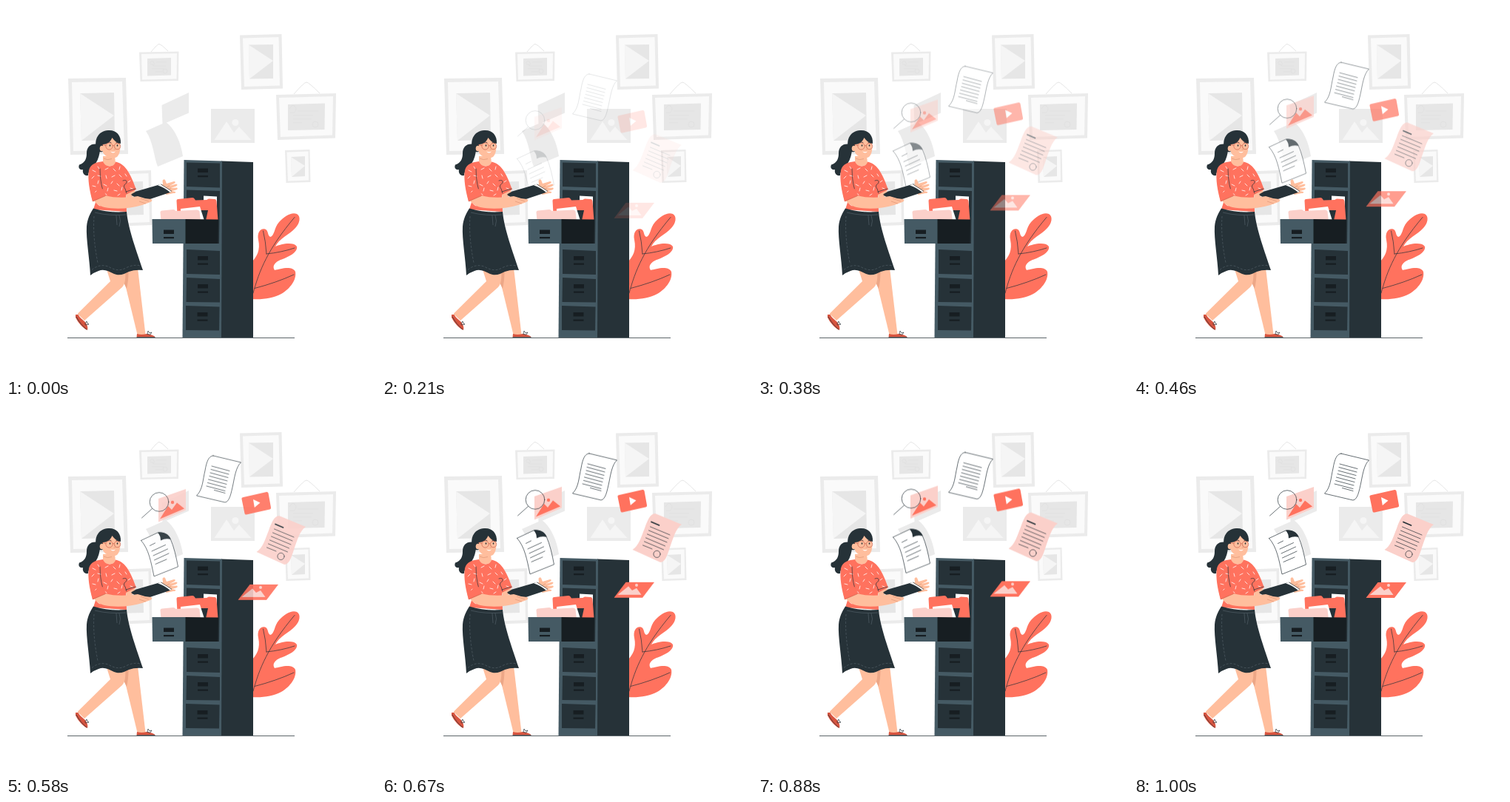
An HTML page that plays this animation: 500x500 px, repeating every 1.04 s.

```html
<!DOCTYPE html>
<html lang="en">
<head>
<meta charset="utf-8">
<title>Filing cabinet</title>
<style>
  html, body { margin: 0; width: 100%; height: 100%; overflow: hidden; background: #fff; }
  svg { display: block; width: 100vw; height: 100vh; }
  .rise { animation: rise 1040ms infinite; }
  @keyframes rise {
    0% { opacity: 0; transform: translateY(30px); animation-timing-function: cubic-bezier(.36, -.01, .5, 1.38); }
    93.5%, 100% { opacity: 1; transform: translateY(0); }
  }
  .g1 { fill: #ebebeb; }
  .g2 { fill: #fafafa; }
  .g3 { fill: #e6e6e6; }
  .g4 { fill: #f5f5f5; }
  .dark { fill: #263238; }
  .mid { fill: #455a64; }
  .deep { fill: #171e22; }
  .red { fill: #ff725e; }
  .pink { fill: #fbd0ca; }
  .shoe { fill: #d8543f; }
  .skin { fill: #ffbe9d; }
  .white { fill: #fff; }
  .line, .sheet { stroke: #263238; stroke-width: .7; stroke-linecap: round; stroke-linejoin: round; }
  .line { fill: none; }
  .sheet { fill: #fff; }
  .faint { fill: none; stroke: #dedede; stroke-width: .7; }
  .wire { fill: none; stroke: #e3e3e3; stroke-width: .9; }
  .seam { fill: none; stroke: #58666d; stroke-width: .6; }
  .dash { stroke-dasharray: 3 2; }
  .fold { fill: none; stroke: #d98f70; stroke-width: .6; }
</style>
</head>
<body>
<svg viewBox="0 0 500 500">
  <defs>
    <g id="handle" class="deep">
      <path d="M0 0h14v5.500H0zM0 9.500h14v2.200H0z"/>
    </g>
  </defs>

  <!-- wall -->
  <g>
    <path class="g1" d="M84 98L162 97L165 200L87 201Z"/>
    <path class="g2" d="M89 103L157 102L160 195L91 196Z"/>
    <path class="g3" d="M100 118L146 117L147 181L102 182Z"/>
    <path class="g4" d="M100 118L146 148L102 182Z"/>

    <path class="wire" d="M196 62Q205 51 207 51.500Q210 52 219 61"/>
    <path class="g1" d="M180 62.500L233.500 61.500L233 101L181.500 102Z"/>
    <path class="g2" d="M183 65L231 64L230.500 98.500L184 99.500Z"/>
    <path class="g3" d="M191 71L223 70L223 93.500L191 94.500Z"/>
    <path class="faint" d="M194 77q4-5 6 0t-5 1M203 76h14M198 81h18M197 85h17M202 89h9M212 88a3 3 0 1 0 6 0a3 3 0 1 0-6 0"/>

    <path class="g1" d="M316 39.500L372.500 38L374 111.500L318 113Z"/>
    <path class="g2" d="M320 43.500L368.500 42L370 107.500L322 109Z"/>
    <path class="g3" d="M328 52.500L361 52L361 98L329 98.500Z"/>
    <path class="g4" d="M328 52.500L361 74L329 98.500Z"/>

    <path class="wire" d="M389 119Q403 103 406 103Q409 103 424 118"/>
    <path class="g1" d="M365 120L446 118L445 178.500L367 181Z"/>
    <path class="g2" d="M369 124L442 122L441 174.500L371 177Z"/>
    <path class="g3" d="M381 133L431 131.500L430.500 167L381 168Z"/>
    <path class="faint" d="M383 139q5-9 9-1q0 8-8 6M394 142h28M388 148h27M388 153h25M388 158h12M414 160a4 4 0 1 0 8 0a4 4 0 1 0-8 0"/>

    <path class="g1" d="M377 195L410.500 194L411.500 238L378.500 239Z"/>
    <path class="g2" d="M379.500 197.500L408.500 196.500L409 235.500L381 236.500Z"/>
    <path class="g3" d="M385 204L404 203L404 230L386 231Z"/>
    <path class="g4" d="M385 204L404 216L386 231Z"/>

    <path class="g1" d="M140 224L196 222L197.500 296L142 298Z"/>
    <path class="g2" d="M145 228L192.500 226L194 292L147 294Z"/>
    <path class="g3" d="M153 238L185 237L186 282L154 283Z"/>

    <path class="g1" d="M277 139H336V185H277Z"/>
    <path class="g4" d="M281.500 181L298 156L308 171L315 163L331.500 181Z"/>
    <circle class="g4" cx="310" cy="157.500" r="4.500"/>

    <path class="g1" d="M210.500 134L247 117V144.500L211.500 160Z"/>
    <path class="g1" d="M189 169L216 157C228 165 237 186 239 203L205 217C200 205 199 183 189 169Z"/>
  </g>

  <path class="dark" d="M83 448.100H390V448.800H83Z"/>

  <!-- leaf -->
  <path class="red" d="M332 396V346C339 339 344 330 341 316C339 306 344 300 350 301.500C355 303 353 310 357 312C363 311 362 300 369 292C376 284 386 278 393 281C399 284 397 294 391 300C383 309 369 314 364 325C371 322 388 318 393 325C395 333 380 340 371 343C364 346 359 351 363 357C370 356 386 350 391 359C393 370 384 382 372 389C361 395 346 397 332 396Z"/>
  <path class="line" d="M334 388C342 358 354 328 390 285.500M352 335Q351 318 347.500 304M352 335Q372 333 390 327M336 381.500Q365 374 389 363"/>

  <!-- cabinet -->
  <path class="dark" d="M291 209.500L334 211V448H291Z"/>
  <path class="mid" d="M240.500 208L292 209.500L291 448H238.500Z"/>
  <g class="dark">
    <path d="M244 211.500L289 212.500V245.500L244 244Z"/>
    <path d="M244 248.500L289 250L288 321H243Z"/>
    <path d="M244 329L289 331V363L244 362Z"/>
    <path d="M244 367L289 369V400.500L243.500 400Z"/>
    <path d="M243 405L288.500 406.500L288 438.500L243 438Z"/>
  </g>
  <use href="#handle" x="259" y="219.500"/>
  <use href="#handle" x="259" y="338"/>
  <use href="#handle" x="259" y="376"/>
  <use href="#handle" x="258.500" y="414"/>

  <path class="white" d="M267 256.500L285 257.500V290H267Z"/>
  <path class="red" d="M230.500 263Q230.500 261 232.500 261L252 259Q254 259 255 261L256 262.500L271 262L274 260.500L282 261Q284 261 284.500 264L286.500 290H232Z"/>
  <path class="dark" d="M262 276H273L270 290H262Z"/>
  <path class="white" d="M236 274L262 271L268 290H236Z"/>
  <path class="pink" d="M208.500 279Q208.500 276.500 211 276.500L226 275Q228 275 229.500 277L258 275.500Q261 275.500 261.500 278L263 290H209.500Z"/>
  <path class="deep" d="M242 288L287 288.500L286.500 321H242Z"/>
  <path class="mid" d="M197.500 288H242.500V321H198Z"/>
  <use href="#handle" x="213" y="302.500"/>

  <!-- flying files -->
  <g class="rise">
    <path class="pink" d="M206 125L243 112V140.500L206 156.500Z"/>
    <path class="red" d="M208 152.500L219 135L224 140L231 130.500L241 138.500Z"/>
    <circle class="red" cx="225" cy="130" r="2.200"/>
    <circle class="line" cx="207" cy="129.500" r="12.800"/>
    <path class="line" d="M197.500 138.500L183.500 151"/>

    <path class="sheet" d="M280 67L317.500 76C311 82 309 95 307 105C304 119 302 129 296 130L257.500 121C266 113 266 99 269 87C271 75 274 67 280 67Z"/>
    <path class="line" d="M278 81l24 6.500M277 85.500l24 6.500M276 90l24 6.500M275 94.500l24 6.500M273.500 99l24.500 6.500M272.500 103.500l24.500 6.500M271 108l25 6.500M281.500 113.500l14.500 4"/>

    <path class="sheet" d="M182.500 181.500L206 170.500C214 171 220 175 222 179C227 190 230 204 232.500 217L200 230C196 211 193 193 182.500 181.500Z"/>
    <path class="dark" d="M205 171C214 169 221 174 222.500 180Q216 178 209 181.500Q209 175 205 171Z"/>
    <path class="line" d="M194.500 188.500L201.500 185M197 196L215.500 187.500M199 202L218.500 193M200.500 208L220 199M202 213.500L217 207"/>

    <path class="red" d="M320 123.200L352 116Q354 115.600 354.500 117.600L358 137Q358.400 139 356.400 139.500L325 146.500Q323 147 322.500 145L318.500 125.500Q318 123.700 320 123.200Z"/>
    <path class="white" d="M334 126L343.500 130.500L335.800 137Z"/>

    <path class="pink" d="M370 148.500L405 163C397 168 393 183 389 194C385 207 382 214 376 214L338.500 197C347 192 350 180 355 168C359 157 363 147 370 148.500Z"/>
    <path class="line" style="stroke-width:1.800" d="M364 159.500L374.500 164"/>
    <path class="line" d="M362.500 166l26.500 11M360.500 171l26.500 11M358.500 176l26.500 11M356.500 181l26 11M354.500 186l26 11M352.500 191l12.500 5"/>
    <circle class="line" cx="371.500" cy="203" r="4.600"/>

    <path class="red" d="M329.500 241H368L352 262H313.500Z"/>
    <path class="pink" d="M318.500 258L333 246.500L338 252L344 249L350.500 258Z"/>
    <circle class="pink" cx="344" cy="245" r="2"/>
  </g>

  <!-- legs -->
  <path class="skin" d="M159 354H178L188.500 444H177.500L161 376Z"/>
  <path fill="#eda787" d="M160 358H165.500Q165.500 372 163 382L159 374Z"/>
  <path class="skin" d="M136 356H161C162 368 161 376 157 380L106 425L96.500 416L141 372Z"/>
  <path class="shoe" d="M94 417L97.500 417C100 422 104 424 107 427C110 431 111 435 110 438C104 436 97 427 94 421Z"/>
  <path class="shoe" d="M177 443Q183 445 190 443Q199 444 202 447.500H176.500Z"/>
  <path class="line" d="M95 420Q101 431 109 437M177 447.500H201M107 429l2-3l1 3l2 1l-4 1zM191 443l1-4l2 3l3-1l-2 3z"/>

  <!-- ponytail -->
  <path class="dark" d="M125 187C115 185 109 190 109 199C109 206 107 212 99 214.500C97 219 100 222 104 221C103 226 106 230 111 229C111 222 117 219 121 213C125 207 127 199 127 193Z"/>

  <!-- far hand, book -->
  <path class="skin" d="M207 242L212 241L211.500 236Q213 233 215 235L217 240L227 237Q230 237 228 239.500L221 243L230 240.500Q233 241 230 243.500L223 246L231 245.500Q233 247 230 248.500L224 250L229 251Q230 253 226 253L217 255L208 249Z"/>
  <path class="fold" d="M221 243L217 245M223 246L219 247.500M224 250L220 250"/>
  <path class="skin" d="M160 250L172 247L177 254L164 261Z"/>
  <path class="dark" d="M169 254.500L176 250.500L207 241.500L223 251.500L190 262.500L178 261L172 257Z"/>
  <path class="white" d="M205 242.200L209.500 241L223.500 250L222 252Q214 245 205 242.200Z"/>
  <path class="line" d="M209.500 241L223.500 250M176 251L179 256L170 256"/>

  <!-- torso -->
  <path class="skin" d="M131 203L147 202L148 213Q142 219 131 214Z"/>
  <path class="red" d="M131 210C123 211 114 213 112 222C110 234 113 250 117 264L122 262L118 275L163 278L162 255L176 248C170 232 163 213 148 210.500C147 218 134 219 131 210Z"/>
  <path fill="none" stroke="#fff" stroke-width=".8" stroke-linecap="round" d="M117 222l4 2M124 217l2 3M134 221l4-2M145 220l3 3M154 217l-1 4M116 233l3-3M124 229l4 1M135 229l1 4M143 231l4-2M153 228l3 3M161 227l2 3M117 243l4 1M124 240l1-4M132 241l4 2M142 240l2-3M150 240l3 3M165 238l3-2M119 253l3-3M127 250l4 1M137 250l1-4M146 249l4 1M156 249l1-4M168 246l3 1M124 268l3 2M133 253l3 2M151 256l3-2"/>
  <path class="line" d="M127 220Q127 243 134 257M158 236Q164 234 163 239Q157 243 161 247L163 253M162 251L175 247"/>

  <!-- near arm -->
  <path class="skin" d="M119 263L134 256C148 260 165 259 178 257L188 260L196 261Q199 263 195 265L184 269C168 274 148 275 133 272C126 270 121 267 119 263Z"/>
  <path class="red" d="M117 264L135 256L131 247L115 254Z"/>
  <path class="fold" style="stroke:#c94f3d" d="M117 264L134.500 256.500"/>
  <path class="fold" d="M182 260L193 264M180 264L189 267"/>

  <!-- skirt -->
  <path class="dark" d="M118 273.500Q140 280 163 278C165 301 177 333 185 357Q174 356 166 359C160 362 154 365 146 362C138 358 132 355 125 358Q119 360 114 364C113 341 108 315 109 298C110 287 114 280 118 273.500Z"/>
  <path class="seam" d="M120 279Q140 284 162 282M149 283L150 296M153 283Q156 290 153 298"/>
  <path class="seam dash" d="M116 356.500Q126 348 138 352C147 357 154 359 164 353Q173 349 182 351M119 284Q117 312 124 347"/>

  <!-- head -->
  <path class="skin" d="M130 183C134 176 151 175 154 184C155 193 154 200 150 204C144 207 134 204 131 198Z"/>
  <path class="dark" d="M122 192C119 180 125 169 138 168C148 167 156 174 155 186C150 185 146 182 143.500 178C141 184 136 187 131 187L130.500 197C126 198 123 196 122 192Z"/>
  <ellipse class="skin" cx="129.500" cy="192.500" rx="2.800" ry="3.800"/>
  <g fill="none" stroke="#c3513f" stroke-width=".6">
    <circle cx="139.500" cy="189.500" r="4.600"/>
    <circle cx="150.500" cy="189.500" r="4.200"/>
    <path d="M144 189Q145.500 188 146.500 189M135 188.500L130 187.500"/>
  </g>
  <g class="dark">
    <ellipse cx="140.500" cy="188.500" rx=".8" ry="1.300"/>
    <ellipse cx="150.500" cy="188.500" rx=".8" ry="1.300"/>
  </g>
  <path class="line" d="M137.500 184.500Q140 183 142 184.500M149 184.500Q151 184 152.500 185.500"/>
  <path class="white" d="M141 196.500Q145 198 148 196.500Q145 200.500 141 196.500Z"/>
  <path class="fold" d="M146 188Q148.500 193 147.500 194L145.500 194M132 206Q137 209 143 206.500"/>
</svg>
</body>
</html>
```
